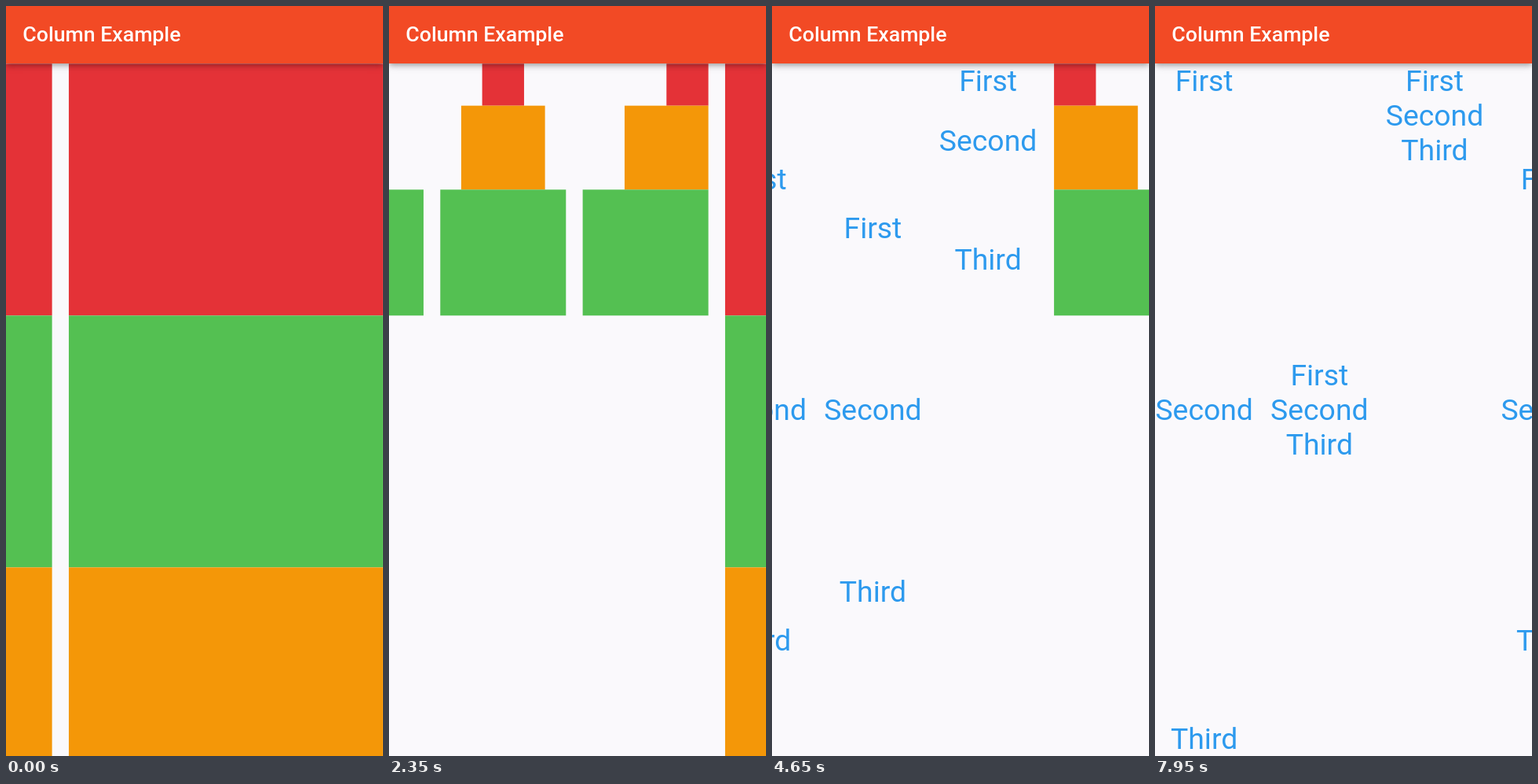
An HTML page for the animation above (8000 ms loop, 480 px wide and 953 px high).

```html
<!DOCTYPE html>
<html lang="en">
<head>
<meta charset="utf-8">
<title>Column Example</title>
<style>
  html, body { margin: 0; width: 100%; height: 100%; overflow: hidden; background: #faf9fc; }
  svg { position: absolute; left: 0; top: 0; }
  header {
    position: absolute; left: 0; top: 0; width: 480px; height: 73.33px;
    background: #f24a25;
    box-shadow: 0 2.7px 5.3px -1.3px #0003, 0 5.3px 6.7px #00000024, 0 1.3px 13.3px #0000001f;
  }
  header span {
    position: absolute; left: 21.33px; top: 0;
    font: 500 26.67px/73.33px Roboto, sans-serif; color: #fff; white-space: nowrap;
  }
  text { font: 37.33px Roboto, sans-serif; fill: #2d9aee; text-anchor: middle; }
</style>
</head>
<body>
<svg width="480" height="953" viewBox="0 0 480 953"><g id="strip"></g></svg>
<header><span>Column Example</span></header>
<script>
const strip = document.getElementById('strip');
const RED = '#e43237', GREEN = '#54c052', ORANGE = '#f49708';
const TOP = 73.33, BODY = 879.67, LINE = 44, GAP = 21.33, LABEL_WIDTH = 125.33;
const BASELINE = 12.7; // from line centre to text baseline
const WORDS = ['First', 'Second', 'Third'];

function add(tag, attributes, content = '') {
  const node = document.createElementNS('http://www.w3.org/2000/svg', tag);
  for (const name in attributes) node.setAttribute(name, attributes[name]);
  node.textContent = content;
  strip.append(node);
}

let left = 0;

function labels(start, ...gaps) {
  let y = TOP + start + LINE / 2;
  WORDS.forEach((word, i) => {
    add('text', { x: left + LABEL_WIDTH / 2, y: y + BASELINE }, word);
    y += LINE + (gaps[i] ?? 0);
  });
  left += LABEL_WIDTH + GAP;
}

// Stacks [width, height, colour] blocks; align runs from 0 (start) to 1 (end).
function blocks(width, align, items) {
  let y = TOP;
  for (const [w, h, fill] of items) {
    add('rect', { x: left + (width - w) * align, y, width: w, height: h, fill });
    y += h;
  }
  left += width + GAP;
}

const free = BODY - 3 * LINE;
labels(0, free / 2, free / 2);
labels(free / 2, 0, 0);
labels(0, 0, 0);
labels(free / 6, free / 3, free / 3);
labels(free / 4, free / 4, free / 4);
labels(0, 32, 106.67);

const steps = [[53.33, 53.33, RED], [106.67, 106.67, ORANGE], [160, 160, GREEN]];
for (const align of [0, 0.5, 1]) blocks(160, align, steps);
for (const width of [106.67, 400]) {
  blocks(width, 0, [RED, GREEN, ORANGE].map(fill => [width, 320, fill]));
}

// Scroll keys: time in s, offset in px, speed in px/s
const keys = [
  [0, 1472, -150], [1.35, 1139, -215], [2.35, 996, 0], [2.6, 996, 0],
  [4.05, 667, -240], [5.35, 362, -205], [6.35, 196, -150], [7.7, 0, 0], [8, 0, 0]
];

function scrollAt(time) {
  const next = keys.findIndex(key => key[0] > time);
  const [t0, x0, v0] = keys[next - 1], [t1, x1, v1] = keys[next];
  const span = t1 - t0, u = (time - t0) / span, r = 1 - u;
  return x0 * r * r * (1 + 2 * u) + x1 * u * u * (3 - 2 * u)
    + span * u * r * (v0 * r - v1 * u);
}

function draw(now) {
  const time = Math.floor((now % 8000) / 50) / 20; // 20 pictures per second
  strip.setAttribute('transform', `translate(${-scrollAt(time)} 0)`);
  requestAnimationFrame(draw);
}
draw(performance.now());
</script>
</body>
</html>
```
